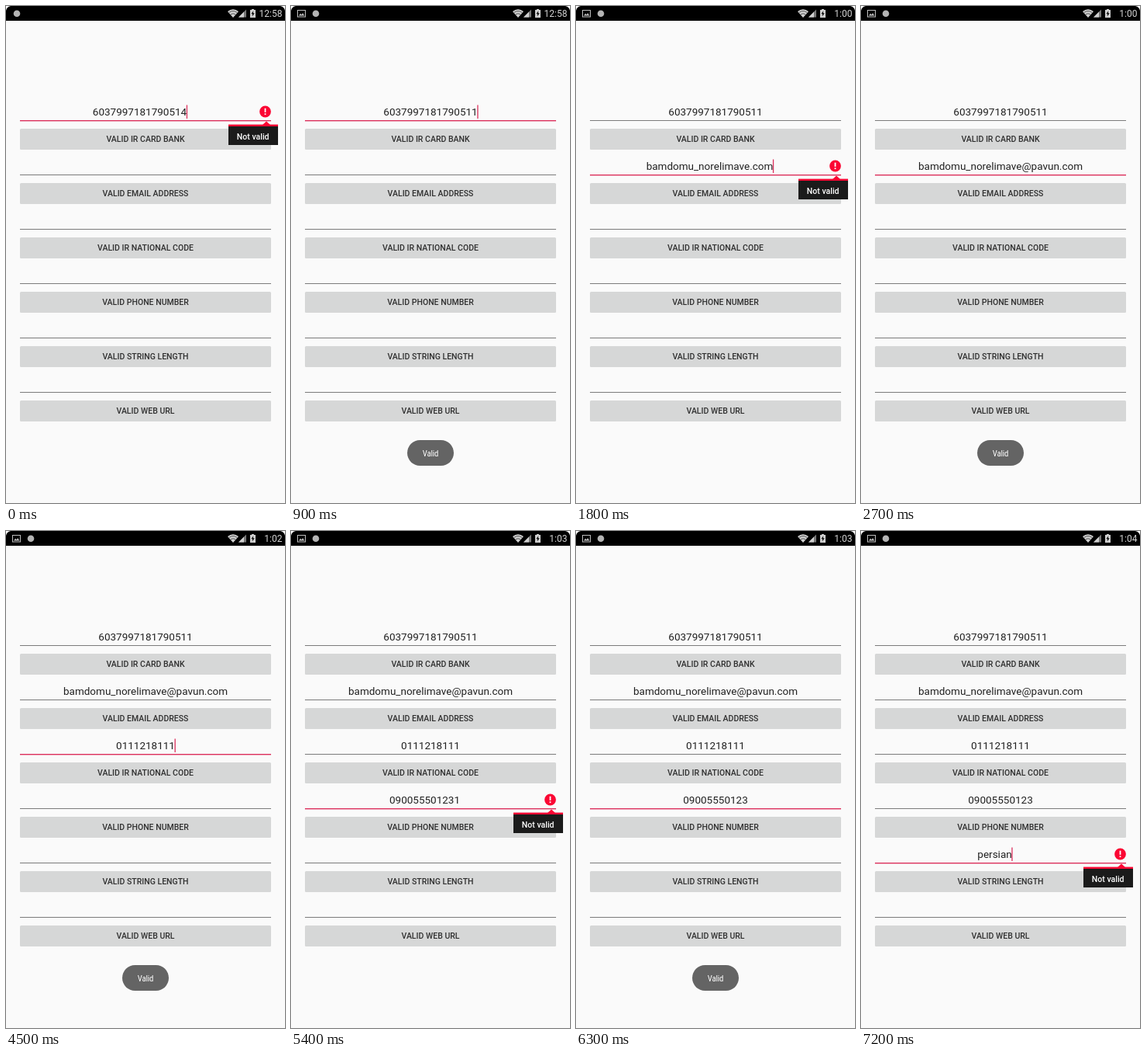
Animation, 360 px wide and 640 px high, one loop 8000 ms. Source, as an HTML page:

```html
<!DOCTYPE html>
<html lang="en">
<head>
<meta charset="utf-8">
<title>Form validation</title>
<style>
  html, body { margin: 0; width: 100%; height: 100%; overflow: hidden; background: #fafafa; }
  svg { display: block; width: 360px; height: 640px; font-family: Roboto, sans-serif; }
  text { text-anchor: middle; fill: #212121; }
  .field { font-size: 13.5px; }
  .label { font-size: 10.5px; font-weight: 500; fill: #303030; }
  .tip { font-size: 10.5px; font-weight: 500; fill: #fff; }
  .toast { font: 10.8px "Roboto Condensed", Roboto, sans-serif; letter-spacing: -.15px; fill: #fff; }
  .clock { font-size: 12px; text-anchor: end; fill: #d4d4d4; }
</style>
</head>
<body>
<svg viewBox="0 0 360 640">
  <path fill="#000" d="M0 19V6Q1 1 6 0H354Q359 1 360 6V19Z"/>
  <g fill="#d0d0d0">
    <path d="M286 7Q293 1.5 300 7L293 15Z"/>
    <path d="M288 8.3Q293 4.8 298 8.3M290 10.7Q293 8.8 296 10.7" fill="none" stroke="#000" stroke-width=".6"/>
    <path d="M300 14.5L310 4.5V14.5Z" fill="#777"/>
    <path d="M300 14.5L307 7.5V14.5Z"/>
    <path d="M315 5H317V4H320V5H322V15H315Z"/>
    <path d="M319.3 6.3L316.4 10.3H318.2L317.6 13.6L320.7 9.3H318.8Z" fill="#000"/>
  </g>
  <g id="scene"></g>
</svg>
<script>
const HOLD = 900, LOOP = 8000;
const LABELS = ["IR CARD BANK", "EMAIL ADDRESS", "IR NATIONAL CODE", "PHONE NUMBER", "STRING LENGTH", "WEB URL"];

// clock, active row, its text, valid, caret shown
const STEPS = [
  ["12:58", 0, "6037997181790514", false, true],
  ["12:58", 0, "6037997181790511", true, true],
  ["1:00", 1, "bamdomu_norelimave.com", false, true],
  ["1:00", 1, "bamdomu_norelimave@pavun.com", true, false],
  ["1:02", 2, "0111218112", false, true],
  ["1:02", 2, "0111218111", true, true],
  ["1:03", 3, "090055501231", false, false],
  ["1:03", 3, "09005550123", true, false],
  ["1:04", 4, "persian", false, true]
];

const scene = document.getElementById("scene");
const rect = (x, y, w, h, fill, r = 0) =>
  `<rect x="${x}" y="${y}" width="${w}" height="${h}" rx="${r}" fill="${fill}"/>`;
const text = (x, y, kind, str) => `<text x="${x}" y="${y}" class="${kind}">${str}</text>`;

const notices = first =>
  (first ? "" : `<path d="M8.5 5.5H18.5V14H8.5Z" fill="none" stroke="#bbb" stroke-width="1.1"/>
    <path d="M10 12.5L12.2 9.6L13.6 11.2L15.2 9L17.4 12.5Z" fill="#bbb"/>`) +
  `<circle cx="${first ? 14 : 32}" cy="9.7" r="4.3" fill="#b4b4b4"/>`;

const errorMark = y => `
  <circle cx="334.5" cy="${y + 136}" r="7.4" fill="#fb0733"/>
  ${rect(333.6, y + 131.7, 1.8, 5.2, "#fff")}${rect(333.6, y + 138.3, 1.8, 1.8, "#fff")}
  <path d="M336 ${y + 148.5}L341 ${y + 153}H331Z" fill="#fb0733"/>
  ${rect(287, y + 152.6, 64, 3, "#fb0733")}${rect(287, y + 155, 64, 24, "#1b1b1b")}
  ${text(318.7, y + 171.7, "tip", "Not valid")}`;

const toast = rect(150, 559, 60, 33, "#646464", 16.5) + text(180, 580, "toast", "Valid");

function draw(index) {
  const [clock, active, , valid, caret] = STEPS[index];
  const values = [];
  for (const [, row, value] of STEPS.slice(0, index + 1)) values[row] = value;

  let out = notices(index === 0) + text(356.5, 14, "clock", clock);
  LABELS.forEach((label, row) => {
    const y = row * 70, focus = row === active;
    out += focus ? rect(18, y + 147, 324, 1.4, "#dc305c") : rect(18, y + 147, 324, 1, "#7b7b7b");
    out += rect(18, y + 158, 324, 27, "#d6d7d7", 1.5) + text(180, y + 175.4, "label", "VALID " + label);
    if (values[row]) out += text(focus && !valid ? 172.5 : 180, y + 141.3, "field", values[row]);
  });
  scene.innerHTML = out + (valid ? toast : errorMark(active * 70));

  if (caret) {
    const field = [...scene.querySelectorAll(".field")].pop();
    const end = +field.getAttribute("x") + field.getComputedTextLength() / 2;
    scene.insertAdjacentHTML("beforeend", rect(end - .4, active * 70 + 127.5, 1.3, 17.5, "#dc305c"));
  }
}

const start = performance.now();
let shown = -1;
function tick() {
  const time = (performance.now() - start) % LOOP;
  const index = Math.min(Math.floor(time / HOLD), STEPS.length - 1);
  if (index !== shown) draw(shown = index);
  requestAnimationFrame(tick);
}
tick();
</script>
</body>
</html>
```
